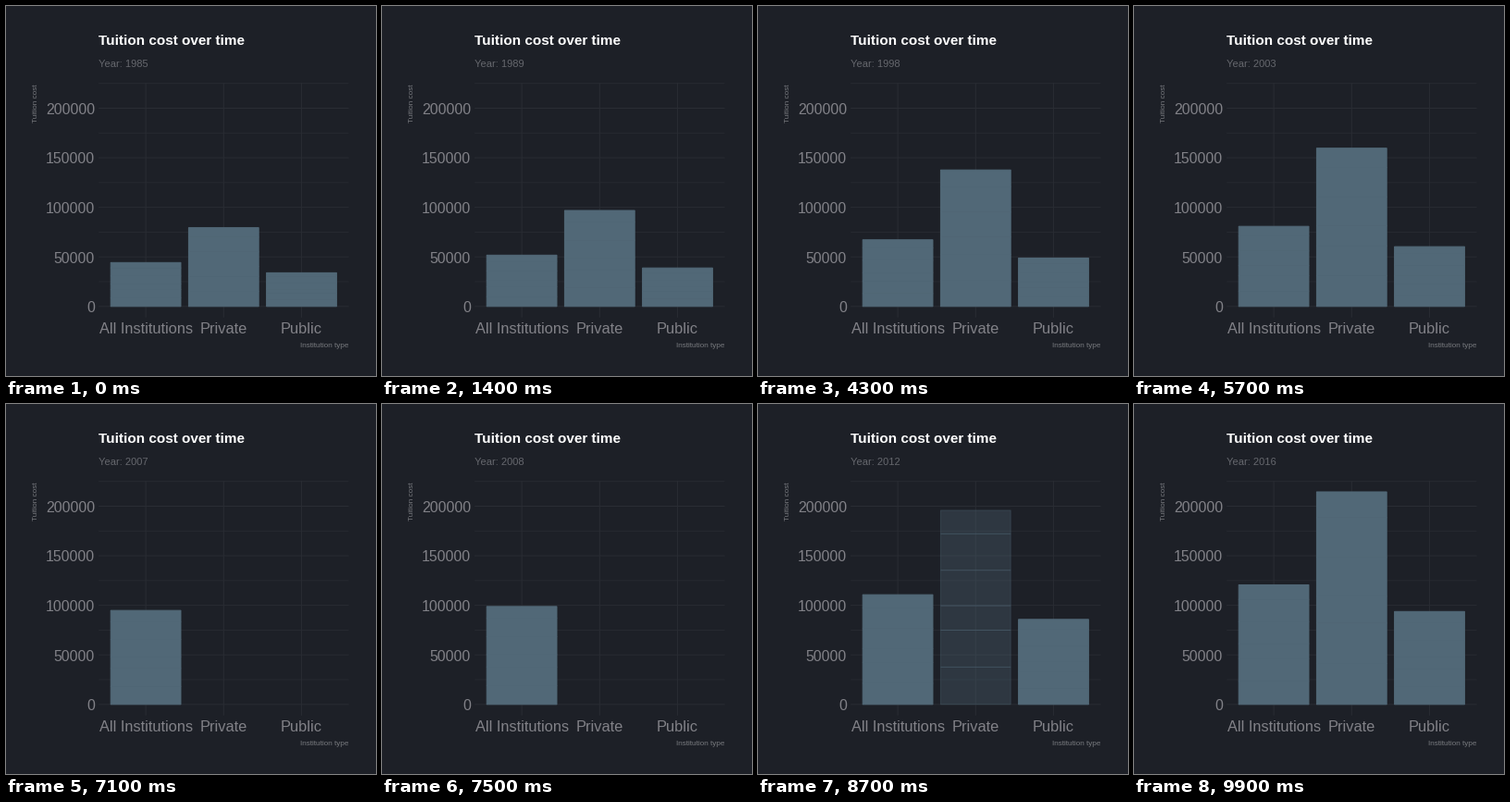
These frames come from a looping animation (400 px wide and 400 px high, 10000 ms). A matplotlib script:

```python
import numpy as np
import matplotlib.pyplot as plt
from matplotlib.animation import FuncAnimation
from matplotlib.patches import Rectangle

SIZE, DPI = 400, 100
FRAMES, INTERVAL = 100, 100
PX = 72 / DPI  # points per pixel

BACK, GRID, BAR = "#1d2027", "#292c33", "#516877"
TICK, SUB, NAME = "#818187", "#65676d", "#76787d"

LEFT, RIGHT, TOP, BOTTOM = 100.6, 370, 83.4, 336.3
ZERO, PER_THOUSAND = 324.8, 1.0715
UNIT = (RIGHT - LEFT) / 3.2
BAR_W = 0.9 * UNIT
PIECES = np.array([40.5, 40, 26.5, 38.5, 39.5, 25.5])
CUTS = np.append(0, PIECES.cumsum() / PIECES.sum())
FADE = 3  # frames in one year

plt.rcParams["font.family"] = "Liberation Sans"
fig = plt.figure(figsize=(SIZE / DPI, SIZE / DPI), dpi=DPI, facecolor=BACK)
ax = fig.add_axes([0, 0, 1, 1])
ax.set_xlim(0, SIZE)
ax.set_ylim(SIZE, 0)
ax.axis("off")


def label(x, y, text, size, color, **kw):
    kw.setdefault("va", "baseline")
    return ax.text(x, y, text, fontsize=size * PX, color=color, **kw)


def grid_line(xs, ys, width=1):
    ax.plot(xs, ys, color=GRID, lw=width * PX, snap=False, zorder=1)


def y_of(thousands):
    return ZERO - thousands * PER_THOUSAND


class Bar:
    """Stacked bar; keys are (frame, thousands), gap is (leaves, is back)."""

    def __init__(self, index, name, keys, gap=None):
        self.keys, self.gap = np.array(keys).T, gap
        x = LEFT + (index + 0.6) * UNIT
        grid_line([x, x], [TOP, BOTTOM])
        label(x, 353.6, name, 16.4, TICK, ha="center")
        self.parts = [
            ax.add_patch(Rectangle((x - BAR_W / 2, ZERO), BAR_W, 0,
                                   facecolor=BAR, edgecolor=BAR,
                                   linewidth=PX, snap=False, zorder=2))
            for _ in PIECES
        ]

    def update(self, frame):
        alpha = 1
        if self.gap and self.gap[0] < frame < self.gap[1]:
            # Hold the height at the nearer end of the gap while fading
            end = min(self.gap, key=lambda g: abs(g - frame))
            alpha = max(0, 1 - abs(frame - end) / FADE)
            frame = end
        levels = y_of(CUTS * np.interp(frame, *self.keys))
        for part, low, high in zip(self.parts, levels, levels[1:]):
            part.set(y=low, height=high - low, alpha=alpha, visible=alpha > 0)


for value in range(0, 226, 25):
    major = value % 50 == 0
    y = y_of(value)
    grid_line([LEFT, RIGHT], [y, y], 1 if major else 0.8)
    if major:
        label(96, y + 6.3, str(value * 1000), 15.9, TICK, ha="right")

label(100, 42.3, "Tuition cost over time", 15.2, "white", weight="bold")
year_text = label(100, 65.6, "", 11.1, SUB)
label(370, 369, "Institution type", 8.2, NAME, ha="right")
label(36.5, 84, "Tuition cost", 8.2, NAME, rotation=90, ha="right", va="top")

bars = [
    Bar(0, "All Institutions", [(0, 44.3), (44, 67.8), (86, 109.9), (99, 120.7)]),
    Bar(1, "Private", [(0, 79.5), (28, 114.2), (57, 159.7), (89, 195.9), (99, 214.5)],
        gap=(67, 89)),
    Bar(2, "Public", [(0, 34), (44, 49.2), (86, 85.2), (99, 93.8)], gap=(67, 86)),
]


def draw(frame):
    year_text.set_text(f"Year: {round(1985 + 31 * frame / (FRAMES - 1))}")
    for bar in bars:
        bar.update(frame)
    return [year_text]


anim = FuncAnimation(fig, draw, frames=FRAMES, interval=INTERVAL,
                     init_func=lambda: draw(0), repeat=True, repeat_delay=0)
plt.show()
```
